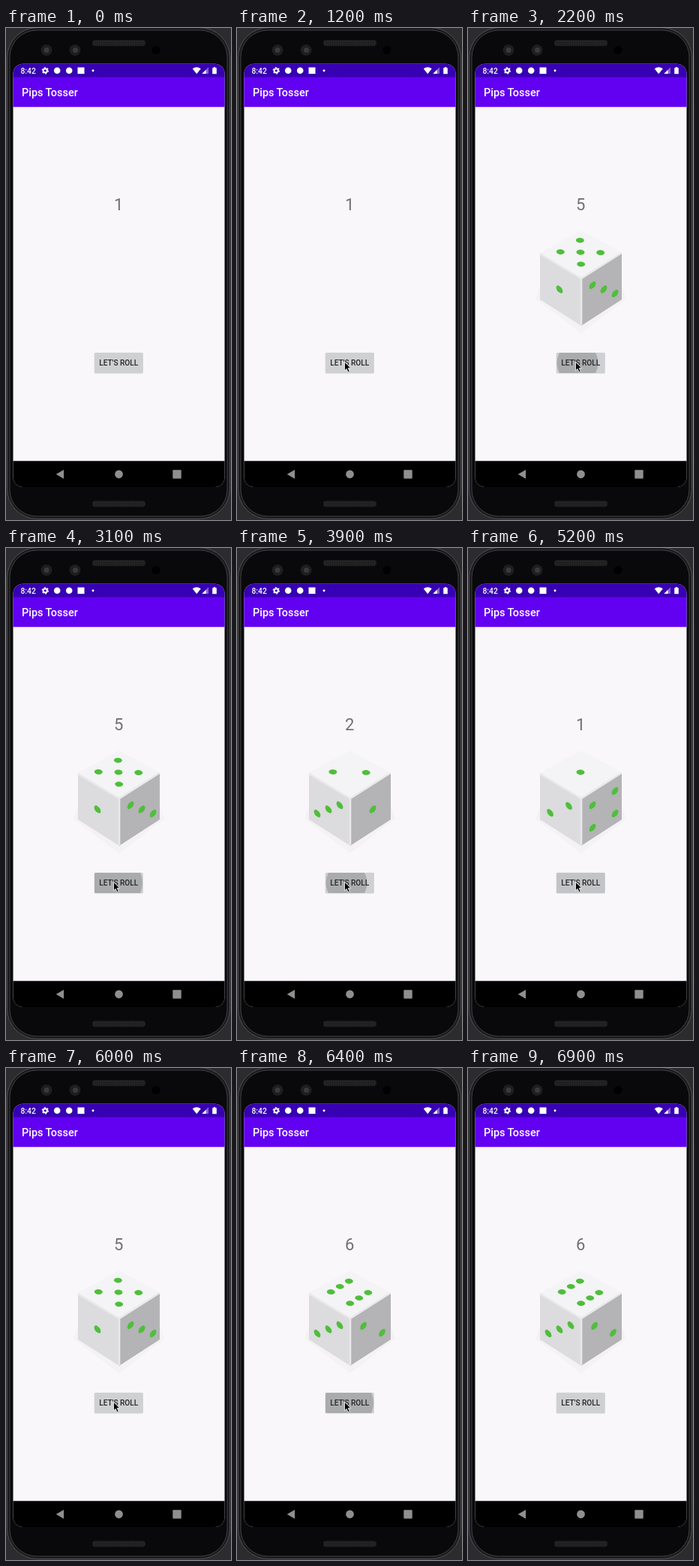
Write an HTML page that moves like this. It is 300 px wide and 656 px high and loops after 8600 ms.

```html
<!DOCTYPE html>
<html lang="en">
<head>
<meta charset="utf-8">
<title>Dice app</title>
<style>
  html, body { margin: 0; width: 100%; height: 100%; overflow: hidden; background: #2c2c2e; }
  svg { display: block; width: 300px; height: 656px; font-family: Roboto, sans-serif; }
</style>
</head>
<body>
<svg viewBox="0 0 300 656">
  <defs>
    <clipPath id="screenClip"><rect x="9.5" y="47.7" width="282" height="564.3" rx="13"/></clipPath>
    <clipPath id="buttonClip"><rect x="118" y="433" width="64.5" height="27" rx="1.5"/></clipPath>
    <pattern id="mesh" width="3" height="3" patternUnits="userSpaceOnUse">
      <rect width="3" height="3" fill="#242425"/><circle cx="1.5" cy="1.5" r=".8" fill="#151516"/>
    </pattern>
  </defs>

  <!-- phone body -->
  <rect x="1.5" y="-.5" width="297" height="655" rx="40" fill="#1b1b1d" stroke="#505053"/>
  <rect x="5" y="3" width="290" height="648" rx="36" fill="#09080b" stroke="#3f3f42"/>
  <g fill="url(#mesh)">
    <rect x="115" y="16" width="71" height="8" rx="4"/>
    <rect x="115" y="630.5" width="71" height="8" rx="4"/>
  </g>
  <g fill="#1e1e20">
    <circle cx="54" cy="29.5" r="7.5"/><circle cx="92" cy="29.5" r="7.5"/>
    <g fill="#39393b"><circle cx="54" cy="29.5" r="3.5"/><circle cx="92.5" cy="29.5" r="3.5"/></g>
    <circle cx="200" cy="29.5" r="5.5" fill="#000"/>
  </g>

  <!-- screen -->
  <g clip-path="url(#screenClip)">
    <rect y="47" width="300" height="566" fill="#f9f7fa"/>
    <rect y="47" width="300" height="19" fill="#3700b3"/>
    <rect y="65.5" width="300" height="39.8" fill="#6200f2"/>
    <rect y="577.3" width="300" height="36" fill="#000"/>
  </g>
  <g fill="#fff">
    <text x="19.5" y="60.5" font-size="10.3" font-weight="500">8:42</text>
    <text x="21" y="91" font-size="14.4" font-weight="500">Pips Tosser</text>
    <circle cx="52.3" cy="56.8" r="2.6" fill="none" stroke="#fff" stroke-width="2"/>
    <circle cx="52.3" cy="56.8" r="4.1" fill="none" stroke="#fff" stroke-width="1.2" stroke-dasharray="2.1 2.19"/>
    <circle cx="68.2" cy="56.8" r="4.3"/>
    <circle cx="84.2" cy="56.8" r="4.3"/>
    <rect x="95.5" y="52.5" width="9" height="8.6"/>
    <circle cx="116" cy="56.8" r="1.5"/>
    <path d="M248.7 54.3Q254.2 50 259.8 54.3L254.2 61.2Z"/>
    <path d="M270 52.3V61H261.3Z" opacity=".4"/>
    <path d="M266.6 55.7V61H261.3Z"/>
    <path d="M275.2 53.2H276.8V52.1H279.2V53.2H280.8V61.3H275.2Z"/>
  </g>
  <g fill="#8f8f90">
    <path d="M66.7 595L77 589V601Z"/>
    <circle cx="150.5" cy="595" r="5.4"/>
    <rect x="222.3" y="589.3" width="11.4" height="11.4" rx="1"/>
  </g>

  <text id="digit" x="150.3" y="243" font-size="22" text-anchor="middle" fill="#706f73"></text>

  <g id="die">
    <path d="M96 345L90 361L151 407L211 361L205 345L151 270Z" fill="#f4f2f5"/>
    <path d="M151 270L205 300L151 334L96 300Z" fill="#f4f3f5"/>
    <path d="M96 300L151 334V397L96 362Z" fill="#dcdbdd"/>
    <path d="M205 300L151 334V397L205 362Z" fill="#b4b3b5"/>
    <path d="M96.5 301.5L151 334L204.5 300M151 333V396" fill="none" stroke="#e9e8ea" stroke-width="2.6"/>
    <!-- each face maps a pip grid of -1..1 onto its plane -->
    <g fill="#4fbe3c">
      <g id="top" transform="matrix(13 -7.7 13.7 8.2 150 299)"></g>
      <g id="left" transform="matrix(-15 -9.5 0 15 122 348.5)"></g>
      <g id="right" transform="matrix(15 -9.5 0 15 181 348.5)"></g>
    </g>
  </g>

  <!-- button -->
  <rect x="117.5" y="432.7" width="65.5" height="28.3" rx="2" fill="#dfdee1"/>
  <rect x="118" y="433" width="64.5" height="27" rx="1.5" fill="#cfd0d2"/>
  <circle id="ripple" cy="446.5" fill="#a9abad" clip-path="url(#buttonClip)"/>
  <text x="150.3" y="449.8" font-size="10.1" font-weight="500" text-anchor="middle" fill="#262627">LET'S ROLL</text>

  <path id="cursor" d="M0 0V11.5L2.6 9.1L4.6 13.6L6.7 12.7L4.7 8.3H8.3Z" fill="#000" stroke="#fff" stroke-width=".8"/>
</svg>
<script>
const LOOP = 8600, STEP = 100, FADE = 300;
const el = id => document.getElementById(id);
const clamp = x => Math.min(1, Math.max(0, x));
const mix = (a, b, k) => a + (b - a) * k;

// the die changes when a press is released
const click = (press, hold, value) => ({ press, release: press + hold, value });
const clicks = [
  click(2200, 0, 5), click(2900, 200, 5), click(3900, 0, 2),
  click(4900, 100, 1), click(5500, 200, 5), click(6200, 200, 6)
];
const neighbours = { 1: [2, 4], 2: [3, 1], 5: [1, 3], 6: [3, 2] };

function pips(n) {
  const grid = [];
  const pair = (u, v) => grid.push([u, v], [-u, -v]);
  if (n % 2) grid.push([0, 0]);
  if (n > 1) pair(1, 1);
  if (n > 3) pair(1, -1);
  if (n === 6) pair(0, 1);
  const spread = n === 2 ? 0.83 : n === 6 ? 0.93 : 1;
  return grid.map(([u, v]) => `<circle cx="${u * spread}" cy="${v * spread}" r=".29"/>`).join('');
}

function showRoll(value) {
  el('digit').textContent = value || 1;
  el('die').style.display = value ? '' : 'none';
  if (!value) return;
  const [left, right] = neighbours[value];
  el('top').innerHTML = pips(value);
  el('left').innerHTML = pips(left);
  el('right').innerHTML = pips(right);
}

function drawRipple(t) {
  const active = clicks.find(c => t >= c.press && t < c.release + FADE);
  const age = active ? t - active.press : 0;
  el('ripple').setAttribute('cx', 146 + age * 0.01);
  el('ripple').setAttribute('r', 27.5 + age * 0.0325);
  el('ripple').style.opacity = active ? clamp((active.release + FADE - t) / FADE) : 0;
}

// the pointer enters, rests, then eases up to the button
function drawCursor(t) {
  const enter = clamp((t - 300) / 100), k = clamp((t - 500) / 400);
  const ease = k * (2 - k);
  const x = mix(mix(112, 129, enter), 143.5, ease);
  const y = mix(mix(522, 512.5, enter), 445.3, ease);
  el('cursor').setAttribute('transform', `translate(${x} ${y})`);
  el('cursor').style.display = t >= 300 && t < 6900 ? '' : 'none';
}

let shown;
function draw(t) {
  const last = clicks.filter(c => c.release <= t).pop();
  const value = last ? last.value : 0;
  if (value !== shown) showRoll(shown = value);
  drawRipple(t);
  drawCursor(t);
}

const origin = performance.now();
function tick() {
  const t = (performance.now() - origin) % LOOP;
  draw(Math.floor(t / STEP) * STEP);
  requestAnimationFrame(tick);
}
tick();
</script>
</body>
</html>
```
